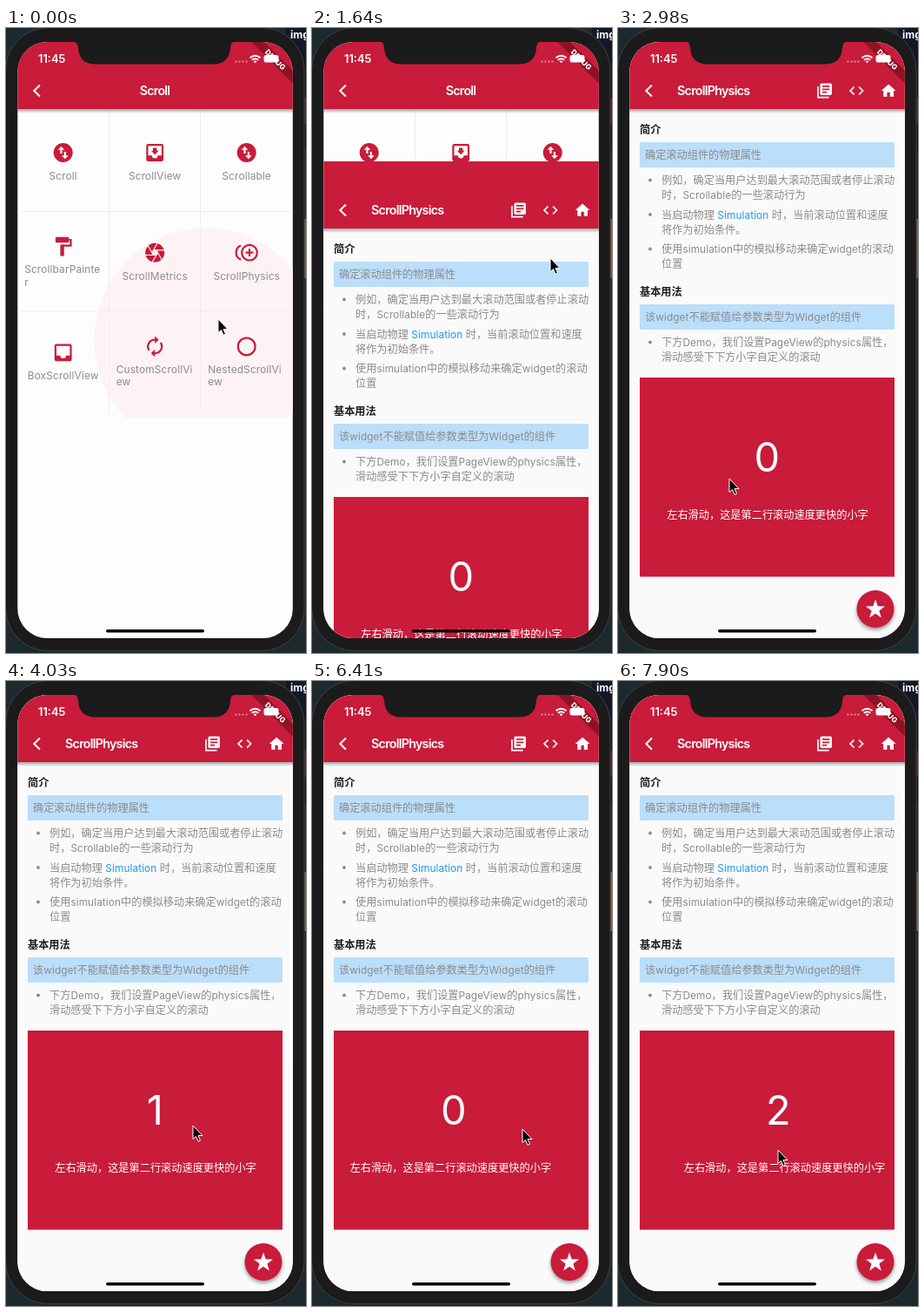
An HTML page for the animation above (8 s loop, 345x717 px).

```html
<!DOCTYPE html>
<html lang="zh-CN">
<head>
<meta charset="utf-8">
<title>ScrollPhysics</title>
<style>
html, body { margin: 0; width: 100%; height: 100%; overflow: hidden; background: #1c2a2e; }
svg { display: block; }
#stage { width: 345px; height: 717px; }
text { font-family: Inter, "Noto Sans CJK SC", "Noto Sans CJK", sans-serif; white-space: pre; }
.label { font-size: 11.9px; fill: #8c8c8c; letter-spacing: .13px; }
.body { font-size: 12.2px; fill: #8b8b8b; }
.head { font-size: 12.2px; fill: #1e1e1e; font-weight: 700; }
.title { font-size: 14.3px; font-weight: 600; fill: #fff; letter-spacing: -.75px; }
.digit { font-size: 47px; fill: #fff; }
.latin { font-size: 11.8px; letter-spacing: .1px; }
.link { fill: #2196f3; }
.note { fill: #fff; }
.mid { text-anchor: middle; }
.line { fill: none; stroke: currentColor; stroke-width: 2; }
</style>
</head>
<body>
<svg id="stage" viewBox="0 0 345 717"></svg>
<script>
const RED = '#c91b3a', LOOP = 8000, TICK = 149, PAGE_W = 293;

const rect = (x, y, w, h, fill, more = '') =>
  `<rect x="${x}" y="${y}" width="${w}" height="${h}" fill="${fill}" ${more}/>`;
const circle = (x, y, r, more = '') => `<circle cx="${x}" cy="${y}" r="${r}" ${more}/>`;
const text = (x, y, cls, s, more = '') => `<text x="${x}" y="${y}" class="${cls}" ${more}>${s}</text>`;
const path = d => `<path d="${d}"/>`;
const line = d => `<path class="line" d="${d}"/>`;

// Latin runs are set slightly smaller than the Chinese around them.
const mixed = (x, mid, s, cls = 'body') =>
  text(x, mid + 4.4, cls, s.replace(/[ -~]+/g, run =>
    `<tspan class="latin${run.includes('Simulation') ? ' link' : ''}">${run}</tspan>`));

// Icons live on a 24 unit grid.
const twice = s => s + `<g transform="rotate(180 12 12)">${s}</g>`;
const ringed = (x, r) => circle(x, 12, r, 'class="line"');
const tray = rect(4, 4, 16, 16, 'none', 'class="line" rx="1"') + path('M4 15h5a3 3 0 0 0 6 0h5v5H4z');

function star() {
  const pts = [];
  for (let i = 0; i < 10; i++) {
    const r = i % 2 ? 4.2 : 10.5, a = i * Math.PI / 5;
    pts.push(12 + r * Math.sin(a), 12.5 - r * Math.cos(a));
  }
  return `<polygon points="${pts.join(' ')}"/>`;
}

function shutter() {
  let s = circle(12, 12, 10) + '<g transform="translate(12 12)" color="#fcf2f4" fill="currentColor">' + path('M-3.5 0l1.75-3h3.5L3.5 0 1.75 3h-3.5z');
  for (let a = 0; a < 360; a += 60) s += `<path d="M-1-2.6H11" stroke="currentColor" transform="rotate(${a})"/>`;
  return s + '</g>';
}

const icons = {
  tray,
  swap: circle(12, 12, 10) + `<g fill="#fdfdfd">${twice(path('M6.5 9L10 5.5 13.5 9H11v4H9V9z'))}</g>`,
  trayIn: tray + path('M16 10h-2V7h-4v3H8l4 4z'),
  roller: rect(4, 2, 14, 6, 'currentColor', 'rx="1"') + line('M18 5h2v6H10') + rect(9, 10, 4, 12, 'currentColor', 'rx="1"'),
  shutter: shutter(),
  plus: ringed(15, 8) + line('M15 8v8M11 12h8M6 4.6a8 8 0 0 0 0 14.8'),
  renew: twice(line('M6 16a7 7 0 0 1 6-11') + path('M12 1l4 4-4 4z')),
  ring: ringed(12, 9),
  books: line('M3 6v15h15') + rect(6, 2, 16, 16, 'currentColor', 'rx="2"') + `<g color="${RED}">${line('M9 6h10M9 10h10M9 14h6')}</g>`,
  code: twice(line('M8.7 6.7L3.4 12l5.3 5.3')),
  home: path('M10 20v-6h4v6h5v-8h3L12 3 2 12h3v8z'),
  star: star()
};
const icon = (name, x, y, scale, color) =>
  `<g color="${color}" fill="currentColor" transform="translate(${x} ${y}) scale(${scale}) translate(-12 -12)">${icons[name]}</g>`;

const bar = () => rect(13, 16, 318, 77, RED) + rect(13, 93, 318, 5, 'url(#shade)') +
  `<g color="#fff">${line('M39 65.5L32.3 72l6.7 6.5')}</g>`;

function menuPage() {
  const cells = [
    ['swap', 'Scroll'], ['trayIn', 'ScrollView'], ['swap', 'Scrollable'],
    ['roller', 'ScrollbarPainte', 'r'], ['shutter', 'ScrollMetrics'], ['plus', 'ScrollPhysics'],
    ['tray', 'BoxScrollView'], ['renew', 'CustomScrollVi', 'ew'], ['ring', 'NestedScrollVi', 'ew']
  ];
  let s = rect(13, 16, 318, 685, '#fdfdfd');
  s += `<svg width="345" height="447">${circle(230, 358, 128.5, 'fill="#fdf3f5"')}</svg>`;
  s += '<path d="M118.5 94V440M223.5 94V440M13 210.5H330M13 325H330" stroke="#eee"/>';
  cells.forEach(([name, a, b], i) => {
    const x = 65.7 + i % 3 * 105.5, y = 143 + (i / 3 | 0) * 114.7 - (b ? 7 : 0);
    s += icon(name, x, y, 1.1, RED);
    s += b
      ? text(x - 44.5, y + 30.5, 'label', a) + text(x - 44.5, y + 45, 'label', b)
      : text(x, y + 31, 'label mid', a);
  });
  return s + bar() + text(171, 77, 'title mid', 'Scroll');
}

function detailPage() {
  const bullet = (y, a, b) =>
    circle(37, y - .5, 1.9, 'fill="#8b8b8b"') + mixed(50, y, a) + mixed(50, y + 16.7, b);
  const section = (y, head, quote) =>
    mixed(25, y, head, 'head') + rect(25, y + 14, 293, 29, '#bbdefb', 'rx="1.5"') + mixed(31, y + 29, quote);

  let s = rect(13, 16, 318, 685, '#fafafa') + bar() + text(68, 77, 'title', 'ScrollPhysics');
  ['books', 'code', 'home'].forEach((name, i) => s += icon(name, 237.5 + i * 36.8, 72, .84, '#fff'));
  s += section(117, '简介', '确定滚动组件的物理属性');
  s += bullet(175, '例如，确定当用户达到最大滚动范围或者停止滚动', '时，Scrollable的一些滚动行为');
  s += bullet(214.5, '当启动物理 Simulation 时，当前滚动位置和速度', '将作为初始条件。');
  s += bullet(254, '使用simulation中的模拟移动来确定widget的滚动', '位置');
  s += section(303, '基本用法', '该widget不能赋值给参数类型为Widget的组件');
  s += bullet(361, '下方Demo，我们设置PageView的physics属性，', '滑动感受下下方小字自定义的滚动');

  s += '<svg x="25" y="401" width="293" height="228.5" viewBox="25 401 293 228.5">' + rect(25, 401, 293, 229, RED);
  for (let n = 0; n < 3; n++) {
    s += text(171.3, 508.5, 'digit mid', n) + mixed(172, 558.5, '左右滑动，这是第二行滚动速度更快的小字', 'body note mid');
  }
  s += '</svg>' + circle(296, 669, 21.5, 'opacity=".4" filter="url(#soft)"');
  return s + circle(296, 666.5, 21.5, `fill="${RED}"`) + icon('star', 296, 666.5, 1.1, '#fff');
}

function statusBar() {
  let s = '<g transform="translate(330 16) rotate(45)">' + rect(-36, 23.5, 72, 10.2, '#7d1220', 'opacity=".8"') +
    text(0, 31.7, 'mid', 'DEBUG', 'font-size="8.4" font-weight="800" fill="#fff"') + '</g>';
  s += text(37, 40, '', '11:45', 'font-size="12.8" font-weight="600" fill="#fff"');
  for (let i = 0; i < 4; i++) s += circle(264.5 + i * 4, 38.5, 1.2, 'fill="#fff" opacity=".4"');
  s += `<g color="#fff" fill="#fff">${line('M280.5 34.2q6-5 12 0M282.8 36.7q3.7-3 7.4 0')}${path('M284.6 38.2q1.9-1.4 3.8 0l-1.9 2z')}</g>`;
  return s + rect(296.5, 31, 17, 8.5, '#fff', 'rx="2.5"');
}

const stage = document.getElementById('stage');
stage.innerHTML = `
<defs>
  <linearGradient id="shade" x2="0" y2="1"><stop stop-opacity=".34"/><stop offset="1" stop-opacity="0"/></linearGradient>
  <filter id="soft" x="-30%" y="-30%" width="160%" height="160%"><feGaussianBlur stdDeviation="2.2"/></filter>
  <clipPath id="screen"><rect x="13.3" y="16" width="316.5" height="684" rx="34"/></clipPath>
</defs>
${rect(0, 0, 345, 717, '#1c2a2e')}
${rect(322, 0, 23, 140, '#121828') + rect(343, 80, 2, 30, '#6d1830') + rect(343, 219, 2, 68, '#8a5a40')}
${rect(-.5, -.5, 343.5, 715, '#1b1b1b', 'rx="49" stroke="#3d4143"')}
${text(327, 12, '', 'img', 'font-size="12" font-weight="700" fill="#fff"')}
<g clip-path="url(#screen)">
  ${menuPage()}
  <g id="detail">${detailPage()}</g>
  ${statusBar()}
  ${rect(115, 690, 113, 3.6, '#000', 'rx="1.8"')}
</g>
<path d="M76 15.5q7 0 7 7q1 19 20 19h135q19 0 20-19q0-7 7-7z" fill="#1b1b1b"/>
<path id="cursor" d="M0 0V15.5L3.5 12.5 6 18.3 8.5 17.2 6 11.5H11z" stroke="#fff"/>`;

const detail = document.getElementById('detail');
const cursor = document.getElementById('cursor');
const digits = [...stage.querySelectorAll('.digit')];
const notes = [...stage.querySelectorAll('.note')];

// Pointer stops: tick, x, y.
const stops = [
  [0, 244, 334], [3, 235, 254], [4, 235, 254], [7, 274, 264], [13, 274, 264],
  [18, 196, 520], [20, 128, 517], [23, 40, 513], [27, 215, 510], [32, 32, 509],
  [36, 106, 509], [41, 327, 513], [43, 242, 514], [47, 130, 518], [50, 262, 528], [53, 184, 538]
];
// Swipes: start tick, direction.
const swipes = [[20, 1], [28, 1], [33, -1], [39.8, -1], [45, 1], [50, 1]];

const smooth = u => u * u * (3 - 2 * u);
const settle = n => n > 0 ? 1 - Math.exp(-((n / 1.7) ** 2)) : 0;
const move = (el, x, y = 0) => el.setAttribute('transform', `translate(${x} ${y})`);

function pointer(k) {
  const i = Math.max(1, stops.findIndex(s => s[0] >= k));
  const [t0, x0, y0] = stops[i - 1], [t1, x1, y1] = stops[i];
  const u = smooth((k - t0) / (t1 - t0));
  return [x0 + (x1 - x0) * u, y0 + (y1 - y0) * u];
}

function draw() {
  const k = Math.floor(performance.now() % LOOP / TICK);
  move(cursor, ...pointer(k));
  move(detail, 0, 137 * Math.max(0, 12 - k) ** 2);
  const pos = swipes.reduce((sum, [t, dir]) => sum + dir * settle(k - t), 0);
  digits.forEach((el, n) => {
    const dx = (n - pos) * PAGE_W;
    move(el, dx);
    move(notes[n], dx * 1.5);
  });
  requestAnimationFrame(draw);
}
draw();
</script>
</body>
</html>
```
